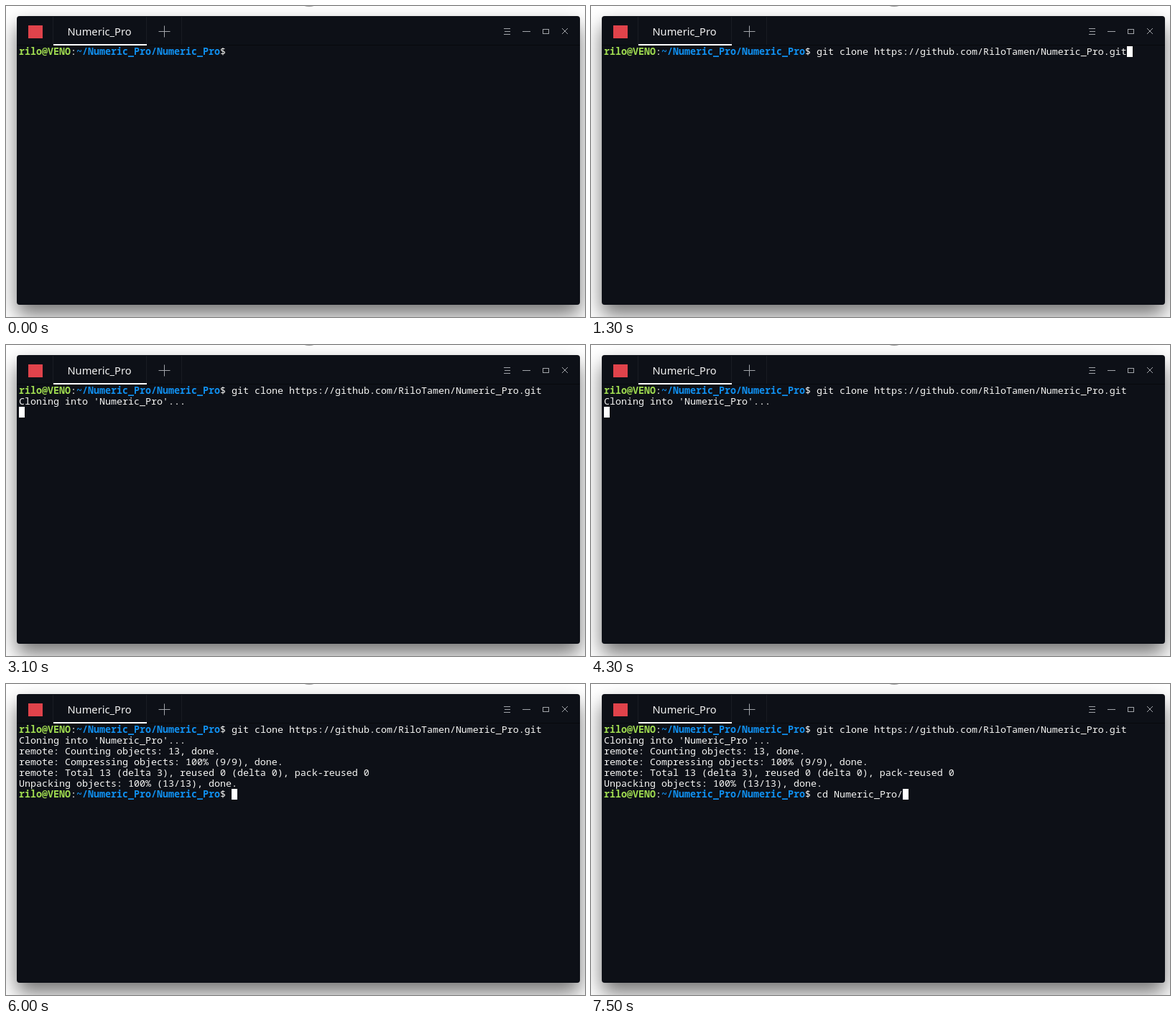
Recreate the animation shown at these times as an HTML page. Size 806x433 px, loop 8 s.

```html
<!DOCTYPE html>
<html lang="en">
<head>
<meta charset="utf-8">
<title>Terminal</title>
<style>
  html, body { margin: 0; width: 100%; height: 100%; overflow: hidden; background: #fff; }
  svg { display: block; }
  text { white-space: pre; }
  .tab { font: 14.667px "Noto Sans", sans-serif; fill: #f2f2f2; text-anchor: middle; }
  #screen { font: 13.3333px "Noto Sans Mono", "DejaVu Sans Mono", monospace; fill: #f6f6f4; font-variant-ligatures: none; }
  .user { font-weight: 700; fill: #a0dc50; }
  .path { font-weight: 700; fill: #1090f0; }
  .under { fill: #3a1f4a; }
  .icons { fill: none; stroke: #a2a5aa; }
</style>
</head>
<body>
<svg width="806" height="433" viewBox="0 0 806 433">
  <defs>
    <filter id="blur" filterUnits="userSpaceOnUse" x="-60" y="-40" width="930" height="540">
      <feGaussianBlur stdDeviation="14"/>
    </filter>
  </defs>
  <rect width="806" height="433" fill="#fff"/>
  <rect x="15" y="28" width="784" height="402" rx="4" opacity=".55" filter="url(#blur)"/>
  <ellipse cx="422" cy="-3" rx="10" ry="4" fill="#999"/>
  <rect x="15" y="14" width="784" height="402" rx="4" fill="#0d1017"/>
  <path d="M65.5 15V54M195.5 15V54M244.5 15V54" stroke="#191c23"/>
  <path d="M15 54.5H799" stroke="#07090d"/>
  <rect x="66" y="53" width="130" height="2" fill="#fff"/>
  <rect x="31" y="27" width="20" height="18" fill="#e0434b"/>
  <text class="tab" x="130" y="41">Numeric_Pro</text>
  <g class="icons">
    <path d="M212.5 35.5H228.5M220.5 27.5V43.5"/>
    <path d="M693 31.5H702M694 35.5H702M693 39.5H702"/>
    <path d="M719 35.5H730"/>
    <rect x="747.5" y="32.5" width="8" height="6"/>
    <path d="M774 31L782 39M782 31L774 39"/>
  </g>
  <g id="screen"></g>
</svg>
<script>
const LOOP = 8000, LEFT = 18, TOP = 56, CELL = 8, ROW = 15, BASELINE = 12;
const USER = "rilo@VENO", PATH = "~/Numeric_Pro/Numeric_Pro";
const PROMPT_COLS = USER.length + PATH.length + 3;
const CLONE = "git clone https://github.com/RiloTamen/Numeric_Pro.git";
const CHANGE_DIR = "cd Numeric_Pro/";
const CLONING = "Cloning into 'Numeric_Pro'...";
const COUNTING = "remote: Counting objects: 13, done.";
const COMPRESSING = "remote: Compressing objects: 100% (9/9)";

const prompt = (command = "") => ({ command });
const cloning = [prompt(CLONE), CLONING];
const compressing = [...cloning, COUNTING, COMPRESSING];
const done = [
  ...cloning, COUNTING, COMPRESSING + ", done.",
  "remote: Total 13 (delta 3), reused 0 (delta 0), pack-reused 0",
  "Unpacking objects: 100% (13/13), done."
];
const after = command => [...done, prompt(command)];

const atEnd = lines => [PROMPT_COLS + lines[lines.length - 1].command.length, lines.length - 1];
const typed = (time, lines) => ({ time, lines, cursor: atEnd(lines) });

// Each state holds until the next one; a missing cursor is blinked off.
const states = [
  { time: 0, lines: [prompt()] },
  typed(400, [prompt("clear")]),
  typed(800, [prompt("ls")]),
  typed(1100, [prompt(CHANGE_DIR)]),
  typed(1300, [prompt(CLONE)]),
  ...[1900, 2500, 3100, 3700, 4300].map((time, i) =>
    ({ time, lines: cloning, cursor: i % 2 ? null : [0, 2] })),
  { time: 4800, lines: compressing, cursor: [0, 3] },
  { time: 4900, lines: compressing },
  { time: 5500, lines: compressing, cursor: [0, 3] },
  typed(6000, after("")),
  { time: 6100, lines: after("") },
  typed(6600, after(CLONE)),
  typed(6800, after("clear")),
  typed(7100, after("ls")),
  typed(7500, after(CHANGE_DIR))
];

const screen = document.getElementById("screen");

function add(tag, attributes, content = "") {
  const node = document.createElementNS("http://www.w3.org/2000/svg", tag);
  for (const [key, value] of Object.entries(attributes)) node.setAttribute(key, value);
  node.textContent = content;
  screen.append(node);
}

function write(content, col, row, style = "") {
  add("text", { x: LEFT + col * CELL, y: TOP + row * ROW + BASELINE, class: style }, content);
}

function writePrompt(command, row) {
  const pathCol = USER.length + 1;
  write(USER, 0, row, "user");
  write(":", USER.length, row);
  write(PATH, pathCol, row, "path");
  write("$", pathCol + PATH.length, row);
  write(command, PROMPT_COLS, row);
}

function draw({ lines, cursor }) {
  screen.replaceChildren();
  lines.forEach((line, row) =>
    typeof line === "string" ? write(line, 0, row) : writePrompt(line.command, row));
  if (!cursor) return;
  const [col, row] = cursor;
  add("rect", { x: LEFT + col * CELL, y: TOP + row * ROW, width: CELL, height: ROW, fill: "#fff" });
  const line = lines[row];
  if (typeof line === "string") write(line[col], col, row, "under");
}

let shown;
const start = performance.now();

function tick() {
  const time = (performance.now() - start) % LOOP;
  const state = states.findLast(s => s.time <= time);
  if (state !== shown) draw(shown = state);
  requestAnimationFrame(tick);
}
tick();
</script>
</body>
</html>
```
